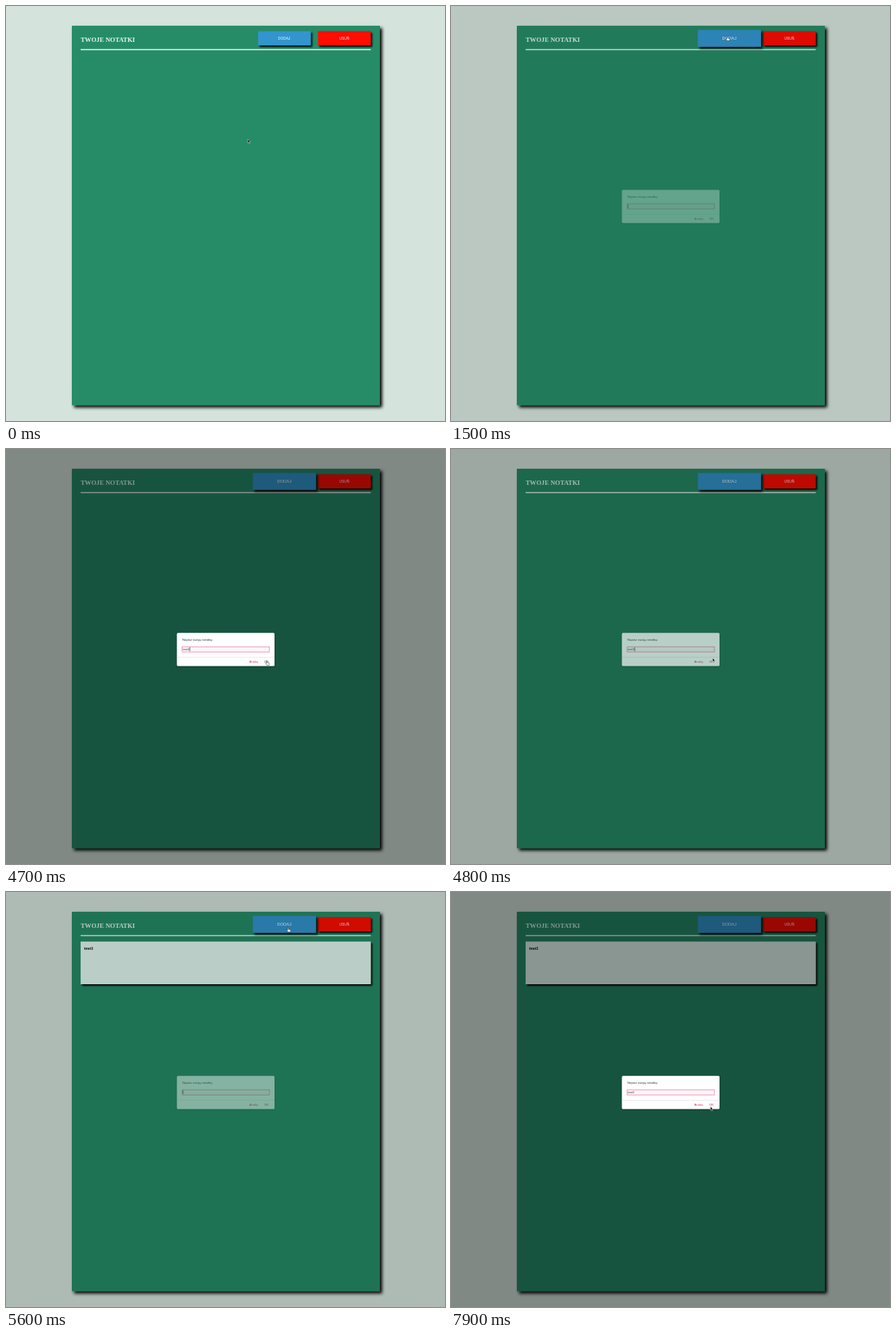
Write an HTML page that moves like this. It is 600x567 px and loops after 8000 ms.

```html
<!DOCTYPE html>
<html lang="pl">
<head>
<meta charset="utf-8">
<title>Notatki</title>
<style>
  html, body { margin: 0; width: 100%; height: 100%; overflow: hidden; background: #d4e3dc; }
  svg { display: block; width: 100vw; height: 100vh; }
  text { font-family: "Liberation Sans", Arial, sans-serif; font-size: 4.3px; }
  .serif { font-family: "Liberation Serif", Times, serif; font-weight: bold; }
  .label { font-size: 4.85px; fill: #fff; text-anchor: middle; }
  .accent { fill: #d52a5c; }
</style>
</head>
<body>
<svg viewBox="0 0 600 567">
  <defs>
    <filter id="panelShadow" x="-5%" y="-5%" width="110%" height="110%">
      <feDropShadow dx="3" dy="3" stdDeviation="2.2" flood-color="#000"/>
    </filter>
    <filter id="boxShadow" x="-15%" y="-30%" width="130%" height="180%">
      <feDropShadow dx="2" dy="2" stdDeviation="1.3" flood-color="#000"/>
    </filter>
    <filter id="dialogShadow" x="-5%" y="-10%" width="110%" height="125%">
      <feDropShadow dx="0" dy="1" stdDeviation="1" flood-opacity=".35"/>
    </filter>
  </defs>

  <rect width="600" height="567" fill="#d4e3dc"/>
  <rect x="90" y="27" width="421" height="518.5" fill="#288c68" filter="url(#panelShadow)"/>
  <text class="serif" x="102" y="49.4" font-size="8.8" style="font-size:8.8px" fill="#e4f8ef">TWOJE NOTATKI</text>
  <rect x="102" y="58.8" width="396.5" height="1.5" fill="#e4f8ef"/>

  <g id="note">
    <rect x="102" y="67.7" width="396.5" height="58.3" fill="#e4faf2" filter="url(#boxShadow)"/>
    <text class="serif" x="106.8" y="79" style="font-size:6.3px">test1</text>
  </g>

  <g>
    <rect x="426.3" y="34.5" width="72.2" height="19.3" fill="#fe0d00" filter="url(#boxShadow)"/>
    <text class="label" x="462.4" y="45.9">USUŃ</text>
  </g>
  <g id="addButton">
    <rect x="344.5" y="34.5" width="72" height="19.3" fill="#3095ce" filter="url(#boxShadow)"/>
    <text class="label" x="380.3" y="45.9">DODAJ</text>
  </g>

  <rect id="dim" width="600" height="567"/>

  <g id="dialog">
    <rect x="233.6" y="251.3" width="133.4" height="45.2" rx="1.5" fill="#fff" filter="url(#dialogShadow)"/>
    <text x="241" y="262.3" fill="#333">Napisz swoją notatkę:</text>
    <rect x="240.8" y="270.2" width="119.2" height="7" fill="#fdf6f8" stroke="#e8819f" stroke-width=".8"/>
    <text id="typed" x="241.6" y="275.1" fill="#333" style="font-size:4.2px"></text>
    <rect id="caret" y="271" width=".7" height="5.2" fill="#222"/>
    <rect x="233.6" y="284.2" width="133.4" height=".6" fill="#dedede"/>
    <text class="accent" x="332.5" y="292.4">Anuluj</text>
    <text id="ok" class="accent" x="353" y="292.4">OK</text>
  </g>

  <g id="cursor" stroke="#fff" stroke-width=".45" stroke-linejoin="round">
    <path id="arrow" d="M0 0V5L1.2 4L2 6L2.9 5.6L2.1 3.7H3.6Z" fill="#000"/>
    <path id="hand" d="M0 0Q.7-.5 1.1.2V2.2L3.6 2.9Q4.2 3.2 4 4.2L3.4 6H.6L-1.2 3.6Q-.9 2.9 0 3.5Z" fill="#fff" stroke="#111"/>
  </g>
</svg>
<script>
const LOOP = 8000, STEP = 100;
const el = id => document.getElementById(id);
const clamp = v => Math.max(0, Math.min(1, v));
const ramp = (t, from, to) => clamp((t - from) / (to - from));
const smooth = v => v * v * (3 - 2 * v);
const show = (id, on) => el(id).setAttribute("visibility", on ? "visible" : "hidden");

// Each stop: time, x, y
const path = [
  [100, 330.3, 182], [400, 413, 54], [600, 413, 54], [700, 411, 54],
  [900, 411, 54], [1100, 377, 41.5], [3600, 377, 41.5], [4400, 356, 289.5],
  [4700, 356, 289.5], [4900, 359, 281.5], [5300, 385, 48.7],
  [7200, 385, 48.7], [7700, 354.5, 293]
];

const sessions = [
  { open: 1400, shown: 1730, close: 4750, word: "test1", keys: [2300, 2800, 3000, 3200, 3500] },
  { open: 5450, shown: 5780, close: 9000, word: "test2", keys: [6500, 6700, 6800, 7000, 7200] }
];
const advance = { t: .278, e: .556, s: .5, 1: .556, 2: .556 };

function cursorAt(t) {
  const i = path.findIndex(p => p[0] > t);
  if (i === 0) return path[0].slice(1);
  if (i < 0) return path[path.length - 1].slice(1);
  const [t0, x0, y0] = path[i - 1], [t1, x1, y1] = path[i];
  const k = smooth(ramp(t, t0, t1));
  return [x0 + (x1 - x0) * k, y0 + (y1 - y0) * k];
}

function drawDialog(t) {
  const s = sessions[t < 5200 ? 0 : 1];
  const opening = ramp(t, s.open, s.shown);
  el("dialog").setAttribute("opacity", opening * (1 - ramp(t, s.close, s.close + 160)));
  el("dim").setAttribute("opacity", .4 * opening * (1 - ramp(t, s.close, s.close + 140)));

  const pressed = s.keys.filter(k => k <= t);
  const typed = s.word.slice(0, pressed.length);
  const width = [...typed].reduce((sum, c) => sum + advance[c], 0) * 4.2;
  const lastChange = pressed.length ? pressed[pressed.length - 1] : s.open;
  el("typed").textContent = typed;
  el("caret").setAttribute("x", 241.6 + width);
  el("caret").setAttribute("opacity", Math.floor((t - lastChange) / 500) % 2 ? 0 : 1);
}

function draw(t) {
  const hover = ramp(t, 1000, 1250) - ramp(t, 4950, 5150) + ramp(t, 5230, 5430);
  const scale = 1 + .2 * smooth(clamp(hover));
  el("addButton").setAttribute("transform",
    `translate(380.5 44.1) scale(${scale}) translate(-380.5 -44.1)`);
  show("note", t >= 5000);
  drawDialog(t);

  const overOk = t >= 4400 && t < 4800;
  const overAdd = (t >= 1050 && t < 1700) || (t >= 5250 && t < 5700);
  const typing = (t >= 2300 && t < 3700) || (t >= 6500 && t < 7300);
  const [x, y] = cursorAt(t);
  el("cursor").setAttribute("transform", `translate(${x} ${y})`);
  show("arrow", !typing && !overOk && !overAdd);
  show("hand", !typing && (overOk || overAdd));
  el("ok").style.fill = overOk ? "#444" : "";
}

const start = performance.now();
function tick() {
  const t = (performance.now() - start) % LOOP;
  draw(Math.floor(t / STEP) * STEP);
  requestAnimationFrame(tick);
}
tick();
</script>
</body>
</html>
```
